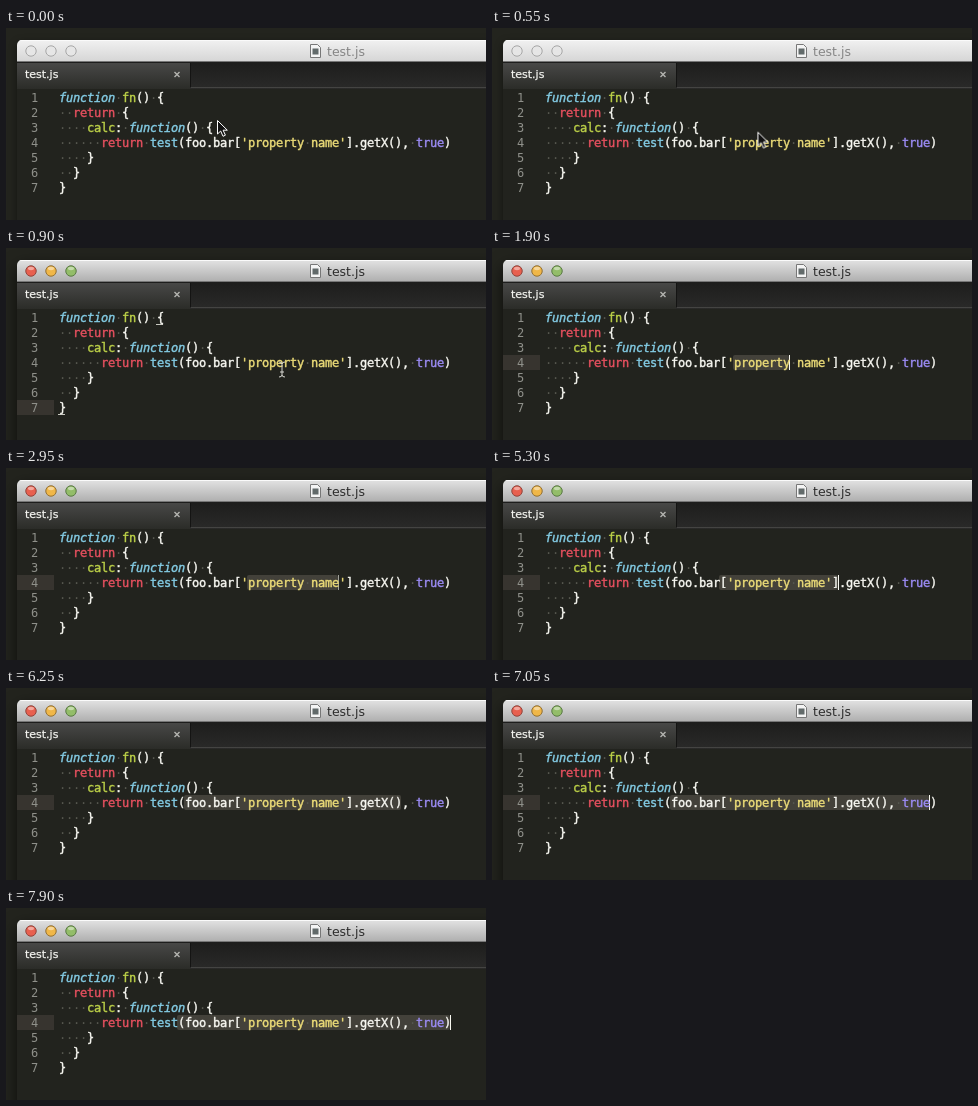
An HTML page for the animation above (8 s loop, 480 by 192 pixels).

```html
<!DOCTYPE html>
<html lang="en">
<head>
<meta charset="utf-8">
<title>Expanding selection</title>
<style>
  html, body { margin: 0; width: 100%; height: 100%; overflow: hidden; background: #23241e; }
  body { position: relative; font-family: "DejaVu Sans", sans-serif; }
  div, svg, pre { position: absolute; margin: 0; }

  /* every animation shares one 8 s clock; hard changes use step-end */
  .anim { animation: 8s step-end -10ms infinite; }

  .window {
    left: 11px; top: 12px; width: 500px; height: 220px;
    border-radius: 5px 0 0 0; overflow: hidden; background: #22231e;
  }
  .shadow {
    left: 11px; top: 12px; width: 500px; height: 220px; border-radius: 5px 0 0 0;
    animation-name: shadow;
  }
  .title {
    left: 0; top: 0; width: 100%; height: 22px; box-sizing: border-box;
    border-bottom: 1px solid #777; box-shadow: inset 0 1px #fafafa;
    animation-name: title;
  }
  .title span { position: absolute; left: 310px; top: 0; font-size: 12.5px; line-height: 23px; }
  .title svg { left: 0; top: 0; }
  .lights { animation-name: active; }
  .tabs { left: 0; top: 22px; width: 100%; height: 27px; background: linear-gradient(#1d1d1c, #2a2a29); }
  .tabs span {
    position: absolute; left: 8px; top: 5px; font-size: 11px; line-height: 15px;
    color: #f4f4f0; -webkit-text-stroke: .25px;
  }

  .mark { left: 11px; width: 37px; height: 15px; background: #37342f; animation-name: mark; }
  pre {
    top: 63px; font: 12px/15px "DejaVu Sans Mono", monospace;
    letter-spacing: calc(7px - 1ch); color: #f8f8f2;
  }
  .nums { left: 25px; color: #8f908a; }
  .code { left: 53px; -webkit-text-stroke: .4px; }
  .key { color: #84cde6; font-style: italic; }
  .name { color: #bcd048; }
  .flow { color: #e6505f; }
  .str { color: #ecdc78; }
  .const { color: #9c8cf5; }
  .call { color: #84cde6; }
  .dot { color: #55564e; font-style: normal; -webkit-text-stroke: 0; }

  .area { left: 52px; top: 62px; }
  .sel { height: 15px; background: #43413a; border-radius: 2px; animation-name: select; }
  .caret {
    right: -1px; top: 0; width: 1px; height: 15px; background: #f8f8f0;
    animation-name: blink; animation-timing-function: linear;
  }
  .pair { width: 7px; height: 1px; background: #c8c8c0; animation-name: pair; }
  .mouse { left: 0; top: 0; overflow: visible; animation-name: mouse; animation-timing-function: linear; }
  .arrow { animation-name: arrow; }
  .beam { animation-name: active; }

  @keyframes shadow {
    0% { box-shadow: 0 3px 8px rgba(0,0,0,.45); }
    9.375%, 100% { box-shadow: 0 6px 16px rgba(0,0,0,.65); }
  }
  @keyframes title {
    0% { background: linear-gradient(#f1f1f1, #d6d6d6); color: #858585; }
    9.375%, 100% { background: linear-gradient(#e2e2e2, #b0b0b0); color: #2c2c2c; }
  }
  @keyframes mark {
    0% { top: 152px; opacity: 0; }
    9.375% { top: 152px; opacity: 1; }
    12.5%, 100% { top: 107px; opacity: 1; }
  }
  @keyframes pair { 0% { opacity: 0; } 9.375% { opacity: 1; } 12.5%, 100% { opacity: 0; } }
  @keyframes select {
    0% { left: 224px; top: 45px; width: 0; }
    23.75% { left: 189px; top: 45px; width: 56px; }
    34.375% { left: 189px; top: 45px; width: 91px; }
    45% { left: 182px; top: 45px; width: 105px; }
    56.875% { left: 175px; top: 45px; width: 119px; }
    67.5% { left: 126px; top: 45px; width: 217px; }
    80.625% { left: 126px; top: 45px; width: 259px; }
    90.625%, 100% { left: 119px; top: 45px; width: 273px; }
  }
  /* the caret fades every half second and is lit again by each new selection */
  @keyframes blink {
    0%, 12.49%, 16.875%, 17.5%, 21.875%, 23.74%, 27.5%, 28.75%, 33.75%, 34.36%,
    38.125%, 39.375%, 43.75%, 44.99%, 48.75%, 50.625%, 55%, 56.86%, 61.25%, 62.5%,
    71.875%, 73.125%, 78.125%, 80.61%, 84.375%, 86.25%, 95%, 96.875% { opacity: 0; }
    12.5%, 15%, 19.375%, 20%, 23.75%, 25.625%, 30.625%, 31.875%, 34.375%, 36.25%,
    41.25%, 41.875%, 45%, 46.25%, 52.5%, 53.125%, 56.875%, 59.375%, 64.375%, 70%,
    75%, 76.25%, 80.625%, 82.5%, 88.125%, 93.125%, 98.75%, 100% { opacity: 1; }
  }
  @keyframes mouse {
    0%, .625% { transform: translate(211px, 92px); }
    6.875% { transform: translate(265px, 103px); }
    10.625%, 13.75% { transform: translate(276px, 121px); }
    16.25%, 100% { transform: translate(288px, 206px); }
  }
  @keyframes arrow { 0% { opacity: 1; } 9.375%, 100% { opacity: 0; } }
  @keyframes active { 0% { opacity: 0; } 9.375%, 100% { opacity: 1; } }
</style>
</head>
<body>
  <div class="shadow anim"></div>
  <div class="window">
    <div class="title anim">
      <svg width="320" height="22">
        <g fill="#e6e6e6" stroke="#a6a6a6">
          <circle cx="14" cy="11" r="5.2"/><circle cx="34" cy="11" r="5.2"/><circle cx="54" cy="11" r="5.2"/>
        </g>
        <g class="lights anim">
          <circle cx="14" cy="11" r="5.2" fill="#e8604f" stroke="#96453c"/>
          <circle cx="34" cy="11" r="5.2" fill="#f0b748" stroke="#987434"/>
          <circle cx="54" cy="11" r="5.2" fill="#93bd69" stroke="#5c7d46"/>
          <g fill="#fff" opacity=".45">
            <ellipse cx="14" cy="8.5" rx="3" ry="1.7"/><ellipse cx="34" cy="8.5" rx="3" ry="1.7"/><ellipse cx="54" cy="8.5" rx="3" ry="1.7"/>
          </g>
        </g>
        <path d="M293.5 4.5h7l3 3v10h-10z" fill="#f4f4f4" stroke="#777"/>
        <rect x="295.5" y="8.5" width="6" height="6" fill="#626a6a"/>
      </svg>
      <span>test.js</span>
    </div>
    <div class="tabs">
      <svg width="500" height="27">
        <linearGradient id="face" x2="0" y2="1">
          <stop stop-color="#484847"/><stop offset="1" stop-color="#2b2c28"/>
        </linearGradient>
        <path d="M174 25.5H500" stroke="#444442"/>
        <path d="M0 1H173V27H0Z" fill="url(#face)"/>
        <path d="M173.5 1V25" stroke="#141413"/>
        <path d="M157.5 10l5 5m0-5l-5 5" stroke="#b4b4b0" stroke-width="1.4"/>
      </svg>
      <span>test.js</span>
    </div>
  </div>

  <div class="mark anim"></div>
  <div class="area">
    <div class="sel anim"><div class="caret anim"></div></div>
    <div class="pair anim" style="left: 98px; top: 14px"></div>
    <div class="pair anim" style="left: 0; top: 104px"></div>
  </div>
  <pre class="nums">1
2
3
4
5
6
7</pre>
  <pre class="code">function fn() {
  return {
    calc: function() {
      return test(foo.bar['property name'].getX(), true)
    }
  }
}</pre>

  <svg class="mouse anim" width="1" height="1">
    <path class="arrow anim" d="M.5 .5V14L3.7 11 6 16.3 8.4 15.2 6.1 10.2H10.3Z" fill="#111" stroke="#fff"/>
    <path class="beam anim" d="M-3 -7Q0 -7 0 -5Q0 -7 3 -7M0 -5V6M-3 8Q0 8 0 6Q0 8 3 8M-2 3H2" fill="none" stroke="#d8d8d2"/>
  </svg>

<script>
  const kinds = {
    key: "function", name: "fn|calc", flow: "return",
    str: "'[^']*'", const: "true", call: "test",
  };
  const rule = new RegExp(
    Object.entries(kinds).map(([kind, re]) => `(?<${kind}>${re})`).join("|"), "g");
  const code = document.querySelector(".code");
  const wrap = (kind, text) => `<span class="${kind}">${text}</span>`;

  // colour the tokens, then show the spaces as dots
  code.innerHTML = code.textContent
    .replace(rule, (text, ...rest) => {
      const groups = rest.at(-1);
      return wrap(Object.keys(kinds).find(kind => groups[kind]), text);
    })
    .replace(/ (?![^<]*>)/g, wrap("dot", "·"));
</script>
</body>
</html>
```
